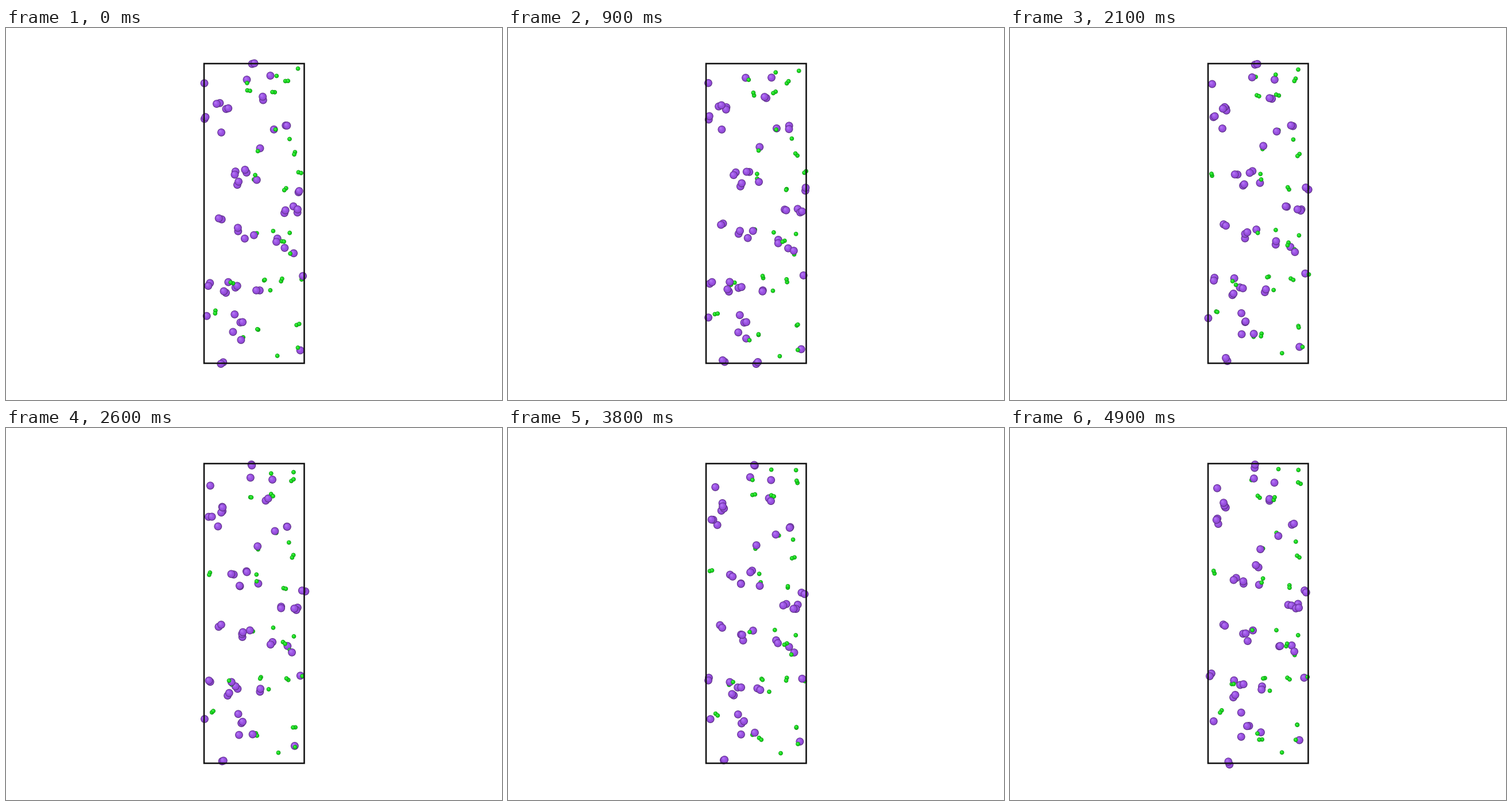
Recreate the animation shown at these times as a matplotlib script. Size 864 by 648 pixels, loop 5 s.

```python
import numpy as np
import matplotlib.pyplot as plt
from matplotlib.animation import FuncAnimation
from matplotlib.patches import Rectangle

WIDTH, HEIGHT, DPI = 864, 648, 72
FRAMES, INTERVAL = 50, 100
BOX_MIN = np.array([345.0, 62.0])
BOX_SIZE = np.array([174.5, 522.0])
STEP, TUMBLE = 1.0, 0.3  # random walk per frame: pixels and bond rotation

# Mean place of each molecule; "p" is a purple atom, "g" a green one.
HOMES = {
    "pp": [(430, 64), (453, 123), (372, 135), (377, 142), (354, 157),
           (490, 172), (393, 256), (421, 249), (406, 272), (516, 284),
           (483, 312), (504, 317), (373, 343), (408, 357), (467, 374),
           (353, 439), (403, 452), (387, 462), (441, 456), (411, 513),
           (377, 580)],
    "pg": [(423, 88), (468, 181), (437, 209), (437, 268), (427, 354),
           (497, 391), (516, 434), (389, 442), (425, 536), (506, 554)],
    "gg": [(497, 93), (428, 117), (463, 116), (501, 222), (350, 252),
           (486, 279), (482, 375), (445, 436), (486, 437), (363, 496),
           (503, 519), (437, 536)],
    "p": [(460, 90), (355, 99), (369, 173), (505, 312), (413, 367),
          (489, 382), (350, 506), (402, 499), (404, 533)],
    "g": [(464, 77), (504, 73), (494, 196), (436, 256), (464, 352),
          (501, 360), (391, 446), (458, 457), (475, 567)],
}
BOND = {"pp": 6.0, "pg": 6.5, "gg": 5.0}
RADIUS = {"p": 6.9, "g": 3.8}
RAMP_STOPS = [0, 0.12, 0.55, 1]
RAMPS = {
    "p": [(88, 46, 130), (142, 72, 208), (157, 84, 230), (180, 118, 244)],
    "g": [(12, 122, 16), (20, 200, 26), (28, 224, 34), (80, 240, 84)],
}
SHADES = np.linspace(0, 1, 7)

rng = np.random.default_rng(12)


def wander(home):
    """Random walk centred on home, kept inside the periodic box."""
    walk = np.cumsum(rng.normal(0, STEP, (FRAMES, 2)), axis=0)
    path = home + walk - walk.mean(axis=0)
    return BOX_MIN + (path - BOX_MIN) % BOX_SIZE


def tumble(length):
    """Random rotation of a bond in space."""
    axis = rng.normal(size=3)
    path = []
    for _ in range(FRAMES):
        axis = axis / np.linalg.norm(axis)
        path.append(axis * length)
        axis = axis + rng.normal(0, TUMBLE, 3)
    return np.array(path)


def build_atoms():
    atoms = []
    for kind, homes in HOMES.items():
        for home in homes:
            level = np.full(FRAMES, rng.uniform(0, 100))
            center = np.column_stack([wander(home), level])
            half = tumble(BOND.get(kind, 0)) / 2
            atoms += [(atom, center + side * half)
                      for atom, side in zip(kind, (-1, 1))]
    return atoms


def shade(kind):
    """Offsets, marker areas and colours of the discs that form a sphere."""
    radius = RADIUS[kind]
    offsets = np.outer(SHADES**1.5, [-0.3, -0.32]) * radius
    areas = (2 * radius * (1 - 0.8 * SHADES)) ** 2
    ramp = np.array(RAMPS[kind]) / 255
    colors = np.column_stack(
        [np.interp(SHADES, RAMP_STOPS, channel) for channel in ramp.T])
    return offsets, areas, colors


ATOMS = build_atoms()
SPHERES = {kind: shade(kind) for kind in RADIUS}

fig = plt.figure(figsize=(WIDTH / DPI, HEIGHT / DPI), dpi=DPI, facecolor="white")
ax = fig.add_axes([0, 0, 1, 1])
ax.set_xlim(0, WIDTH)
ax.set_ylim(HEIGHT, 0)
ax.axis("off")
discs = ax.scatter([], [], linewidths=0, zorder=2)
ax.add_patch(Rectangle(BOX_MIN, *BOX_SIZE, fill=False, edgecolor="#111111",
                       linewidth=2.6, snap=False, zorder=3))


def draw(frame):
    ordered = sorted(ATOMS, key=lambda atom: atom[1][frame, 2])
    places, areas, colors = [], [], []
    for kind, path in ordered:
        offsets, sphere_areas, sphere_colors = SPHERES[kind]
        places.append(path[frame, :2] + offsets)
        areas.append(sphere_areas)
        colors.append(sphere_colors)
    discs.set_offsets(np.vstack(places))
    discs.set_sizes(np.concatenate(areas), dpi=DPI)
    discs.set_facecolors(np.vstack(colors))
    return [discs]


animation = FuncAnimation(fig, draw, frames=FRAMES, interval=INTERVAL,
                          repeat=True, repeat_delay=0)
plt.show()
```
